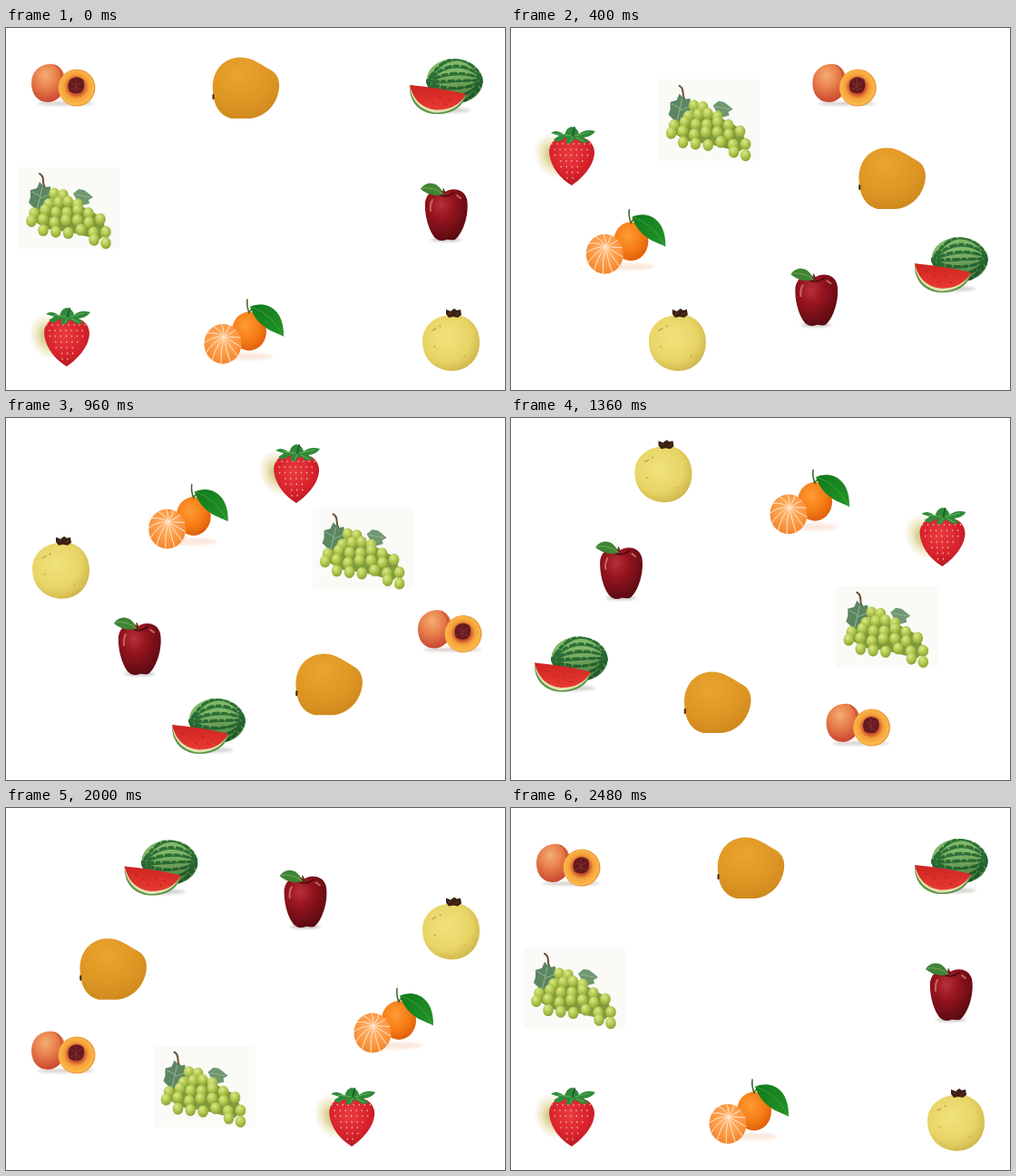
These frames come from a looping animation (550x400 px, 2.56 s). An HTML page:

```html
<!DOCTYPE html>
<html lang="en">
<head>
<meta charset="utf-8">
<title>Circling fruit</title>
<style>
  html, body { margin: 0; width: 100%; height: 100%; overflow: hidden; background: #fff; }
  svg { display: block; width: 550px; height: 400px; }
  .shadow { filter: url(#soft); opacity: .5; }
</style>
</head>
<body>
<svg viewBox="0 0 550 400" fill="none" stroke-linecap="round">
  <defs>
    <filter id="soft" x="-50%" y="-100%" width="200%" height="300%"><feGaussianBlur stdDeviation="1.6"/></filter>
    <radialGradient id="peachSkin" cx=".42" cy=".3" r=".72">
      <stop offset="0" stop-color="#f4ad72"/><stop offset=".45" stop-color="#e9804c"/><stop offset="1" stop-color="#c8452e"/>
    </radialGradient>
    <radialGradient id="peachFlesh" cx=".5" cy=".47" r=".55">
      <stop offset=".4" stop-color="#c8502c"/><stop offset=".62" stop-color="#f6a03a"/><stop offset="1" stop-color="#fcc24e"/>
    </radialGradient>
    <radialGradient id="mangoSkin" cx=".4" cy=".28" r=".8">
      <stop offset="0" stop-color="#eca431"/><stop offset=".55" stop-color="#df9724"/><stop offset="1" stop-color="#cc861c"/>
    </radialGradient>
    <linearGradient id="melonShade" x2=".2" y2="1">
      <stop offset=".4" stop-color="#0c3a14" stop-opacity="0"/><stop offset="1" stop-color="#0c3a14" stop-opacity=".5"/>
    </linearGradient>
    <linearGradient id="melonFlesh" x2="0" y2="1">
      <stop offset="0" stop-color="#cf2422"/><stop offset="1" stop-color="#e83a30"/>
    </linearGradient>
    <radialGradient id="appleSkin" cx=".38" cy=".3" r=".72">
      <stop offset="0" stop-color="#b83038"/><stop offset=".4" stop-color="#95141e"/><stop offset="1" stop-color="#5a0a12"/>
    </radialGradient>
    <radialGradient id="guavaSkin" cx=".42" cy=".4" r=".65">
      <stop offset="0" stop-color="#f0e27c"/><stop offset=".65" stop-color="#e8d566"/><stop offset="1" stop-color="#cdb44a"/>
    </radialGradient>
    <radialGradient id="orangeSkin" cx=".4" cy=".35" r=".7">
      <stop offset="0" stop-color="#ff9c34"/><stop offset=".6" stop-color="#f57a14"/><stop offset="1" stop-color="#dc5c0a"/>
    </radialGradient>
    <radialGradient id="peeled" cx=".5" cy=".4" r=".65">
      <stop offset="0" stop-color="#ffb870"/><stop offset=".6" stop-color="#fb9844"/><stop offset="1" stop-color="#f28026"/>
    </radialGradient>
    <radialGradient id="berrySkin" cx=".45" cy=".35" r=".7">
      <stop offset="0" stop-color="#ea3c40"/><stop offset=".6" stop-color="#d8222c"/><stop offset="1" stop-color="#b01822"/>
    </radialGradient>
    <radialGradient id="berryGlow">
      <stop offset=".3" stop-color="#d9cf94"/><stop offset=".6" stop-color="#efe9c8"/><stop offset="1" stop-color="#fff"/>
    </radialGradient>
    <radialGradient id="grapeSkin" cx=".38" cy=".3" r=".75">
      <stop offset="0" stop-color="#dce88c"/><stop offset=".5" stop-color="#b2c84e"/><stop offset="1" stop-color="#819e32"/>
    </radialGradient>
    <linearGradient id="orangeLeaf" y2="1">
      <stop offset="0" stop-color="#0f7a1c"/><stop offset="1" stop-color="#249428"/>
    </linearGradient>
    <clipPath id="melonClip"><ellipse cx="494.500" cy="52.500" rx="31" ry="24.500" transform="rotate(3 494 52)"/></clipPath>
    <clipPath id="peeledClip"><ellipse cx="239" cy="349" rx="20.500" ry="22"/></clipPath>
  </defs>

  <g id="peach">
    <ellipse class="shadow" cx="66" cy="83.500" rx="32" ry="2" fill="#a89a94"/>
    <path d="M46 40C59 38 66 49 65 61 64 74 56 82 46 82 35 82 28 73 28 61 28 49 36 41 46 40Z" fill="url(#peachSkin)"/>
    <path d="M54 41Q63 47 61 59" stroke="#b8452e"/>
    <ellipse cx="78" cy="66" rx="20.500" ry="20.500" fill="#eb9838"/>
    <ellipse cx="77.500" cy="66" rx="19.500" ry="19.500" fill="url(#peachFlesh)"/>
    <path d="M70 58Q77 51 85 57 88 65 83 71 76 74 70 70 67 64 70 58Z" fill="#661a20"/>
    <path d="M72 60l5 4 6-4M71 68l6-3 6 4M77 56v14" stroke="#8c3434" stroke-width=".8"/>
  </g>

  <g id="mango">
    <path d="M228 70C226 52 236 34 256 32.500 271 31.500 280 40 291 46 299 50 302 58 301 67 299 84 286 99 268 100H248C235 96 229 86 228 70Z" fill="url(#mangoSkin)"/>
    <path d="M228.500 74v4" stroke="#3c2810" stroke-width="2"/>
  </g>

  <g id="watermelon">
    <g transform="translate(0 6)">
      <ellipse class="shadow" cx="487" cy="85" rx="25" ry="3" fill="#a4aea0"/>
      <g clip-path="url(#melonClip)">
        <path d="M460 26h68v54h-68Z" fill="#82b868"/>
        <g id="stripes" stroke="#2c7038" stroke-width="3.200"/>
        <path d="M460 26h68v54h-68Z" fill="url(#melonShade)"/>
      </g>
      <path d="M445 57C444 72 452 87 472 89 490 90 504 82 507 68Z" fill="#5c9448"/>
      <path d="M445 57C446 72 455 85 473 87.500 489 87.500 502 80 506 68Z" fill="#e2e2b0"/>
      <path d="M445 57Q478 60 507 67C501 79 489 84.500 474 84.500 457 83 448 71 445 57Z" fill="url(#melonFlesh)"/>
      <path d="M457 66l1 1M466 71l1 1M478 70l1 1M488 73l1 1M471 77l1 1M484 78l1 0" stroke="#8c1818"/>
    </g>
  </g>

  <g id="apple">
    <ellipse class="shadow" cx="485" cy="234" rx="17" ry="2" fill="#8c8484"/>
    <path d="M484 181C491 176 505 177 508 189 511 205 504 226 496 233 492 236 489 233 485 234 480 236 476 235 472 231 465 222 461 205 462 192 465 178 477 177 484 181Z" fill="url(#appleSkin)"/>
    <path d="M476 183Q484 189 494 182" stroke="#560810" stroke-width="2"/>
    <path d="M484 186Q484 181 482 178" stroke="#4c3018" stroke-width="1.500"/>
    <path d="M482 184C470 187 462 182 457 178 462 169 477 168 482 184Z" fill="#3f8434"/>
    <path d="M459 177Q471 175 481 183" stroke="#76a958"/>
    <path d="M470 190Q467 196 468 202M497 185l4 3" stroke="#e09090" stroke-width="2" opacity=".65"/>
  </g>

  <g id="guava">
    <path d="M490 317C509 315 522 329 522 347 522 366 509 379 491 379 472 378 459 365 459 346 459 330 471 318 490 317Z" fill="url(#guavaSkin)"/>
    <path d="M485 311l5 2 4-3 3 2 4-1 1 6-4 3-5-1-5 1-3-4Z" fill="#3a2114"/>
    <path d="M488 316l3-2M496 317l3-2" stroke="#7c3524"/>
    <path d="M470 334l4-2M478 329l1 1M472 352l1 0M505 363l1 0" stroke="#c4aa48" stroke-width="1.500"/>
  </g>

  <g id="tangerine">
    <ellipse class="shadow" cx="266" cy="363" rx="28" ry="4" fill="#f6d2bc"/>
    <ellipse cx="268" cy="335" rx="19" ry="21.500" fill="url(#orangeSkin)"/>
    <path d="M268 315Q265 307 266 300M268 314q4-5 6-7" stroke="#3e6420" stroke-width="1.500"/>
    <path d="M269 308C284 301 307 308 306 341 299 336 278 334 269 308Z" fill="url(#orangeLeaf)"/>
    <path d="M270 308Q292 315 305 339" stroke="#4ca444" stroke-width=".8"/>
    <ellipse cx="239" cy="349" rx="20.500" ry="22" fill="url(#peeled)"/>
    <g id="segments" clip-path="url(#peeledClip)" stroke="#ffe6cc"/>
  </g>

  <g id="strawberry">
    <ellipse cx="46" cy="341" rx="20" ry="26" fill="url(#berryGlow)" transform="rotate(-22 46 341)"/>
    <path d="M67 323C77 317 92 323 92 338 91 354 77 367 67 374 55 367 43 353 42 337 42 323 56 317 67 323Z" fill="url(#berrySkin)"/>
    <g id="seeds" fill="#f8b8a4"/>
    <path d="M44 316Q50 311 59 318 61 310 67 309 74 311 75 317 82 311 93 314 89 320 80 321L86 326 78 327 71 322 66 327 61 328 61 321 52 326 47 323 53 319 44 316Z" fill="#2f8a3a"/>
    <path d="M66 319l-14-2M71 319l15-4M68 320l-3 6M72 321l8 4" stroke="#64b458"/>
    <path d="M68 319l2-9" stroke="#205f2c" stroke-width="2"/>
  </g>

  <g id="grapes">
    <path d="M14 154h112v90H14Z" fill="#fafaf7"/>
    <path d="M37 161q4 2 4 8t5 12" stroke="#6c5038" stroke-width="2"/>
    <path d="M27 179l7-2 3-7 6 6 6-1v11l1 8-8 7-8 5-3-7-6-6 2-6Z" fill="#5c8662"/>
    <path d="M74 183l6-5 6 1 4 3 6 5-5 3 1 4-8 2-6-6Z" fill="#6f9870"/>
    <path d="M40 176l-6 26M38 186l-9-5M38 188l10-4M77 184l15 3" stroke="#95b494"/>
    <path d="M56 183L80 195 104 208 112 226 103 234 72 226 44 222 29 212 34 201 48 195Z" fill="#7f9a3c"/>
    <g id="bunch" fill="url(#grapeSkin)"/>
  </g>
</svg>

<script>
const FRAME_MS = 80, FRAMES = 32;
const KEYS = [0, 7, 15, 23, 31];

// Offsets from the starting place at each key in between
const ROUTES = {
  peach:      [[426, 0], [426, 276], [0, 276]],
  mango:      [[218, 140], [16, 281], [-195, 149]],
  watermelon: [[0, 276], [-419, 276], [-419, 2]],
  apple:      [[-208, 132], [-416, -1], [-207, -137]],
  guava:      [[-430, 0], [-430, -287], [0, -282]],
  tangerine:  [[-190, -139], [16, -279], [220, -134]],
  strawberry: [[0, -280], [405, -280], [419, 0]],
  grapes:     [[208, -136], [393, -6], [198, 145]],
};

const byId = id => document.getElementById(id);

function add(parent, tag, attrs) {
  const node = document.createElementNS('http://www.w3.org/2000/svg', tag);
  for (const name in attrs) node.setAttribute(name, attrs[name]);
  byId(parent).append(node);
}

for (let i = 0; i < 7; i++) {
  add('stripes', 'path', {
    d: `M463 ${55 - i * .5}Q494 ${4 + i * 16} 526 ${49 + i}`,
    'stroke-dasharray': `${3 + i % 3} 4.500 6 4`,
  });
  add('stripes', 'path', { d: `M463 55Q494 ${7 + i * 16} 526 50`, 'stroke-width': 1.3 });
}

for (let i = 0; i < 13; i++) {
  const a = i * Math.PI * 2 / 13 + .2, x = Math.cos(a), y = Math.sin(a);
  add('segments', 'path', {
    d: `M240 341Q${240 + 14 * x - 3 * y} ${343 + 14 * y + 3 * x} ${239 + 23 * x} ${349 + 25 * y}`,
  });
}

for (let row = 0; row < 7; row++) {
  const half = 22 - Math.max(0, row - 1) * 3.4;
  for (let x = -half + row % 2 * 3; x <= half; x += 6)
    add('seeds', 'ellipse', { cx: 67 + x, cy: 328 + row * 6.3, rx: .7, ry: 1 });
}

// Each row of grapes: y, first x, last x, count
const rows = [
  [183, 53, 63, 2], [193, 47, 79, 4], [203, 31, 91, 6],
  [213, 28, 104, 7], [225, 41, 110, 6], [236, 97, 110, 2],
];
rows.forEach(([y, from, to, count], r) => {
  for (let i = 0; i < count; i++)
    add('bunch', 'ellipse', {
      cx: from + (to - from) * i / (count - 1),
      cy: y + 2 * Math.sin(i * 2.3 + r),
      rx: 5.8, ry: 6.6,
    });
});

function offsetAt(route, frame) {
  const stops = [[0, 0], ...route, [0, 0]];
  const leg = Math.min(3, KEYS.findLastIndex(key => key <= frame));
  const part = (frame - KEYS[leg]) / (KEYS[leg + 1] - KEYS[leg]);
  return stops[leg].map((v, axis) => v + (stops[leg + 1][axis] - v) * part);
}

function draw(now) {
  const frame = Math.floor(now / FRAME_MS) % FRAMES;
  for (const name in ROUTES)
    byId(name).setAttribute('transform', `translate(${offsetAt(ROUTES[name], frame)})`);
  requestAnimationFrame(draw);
}
draw(performance.now());
</script>
</body>
</html>
```
